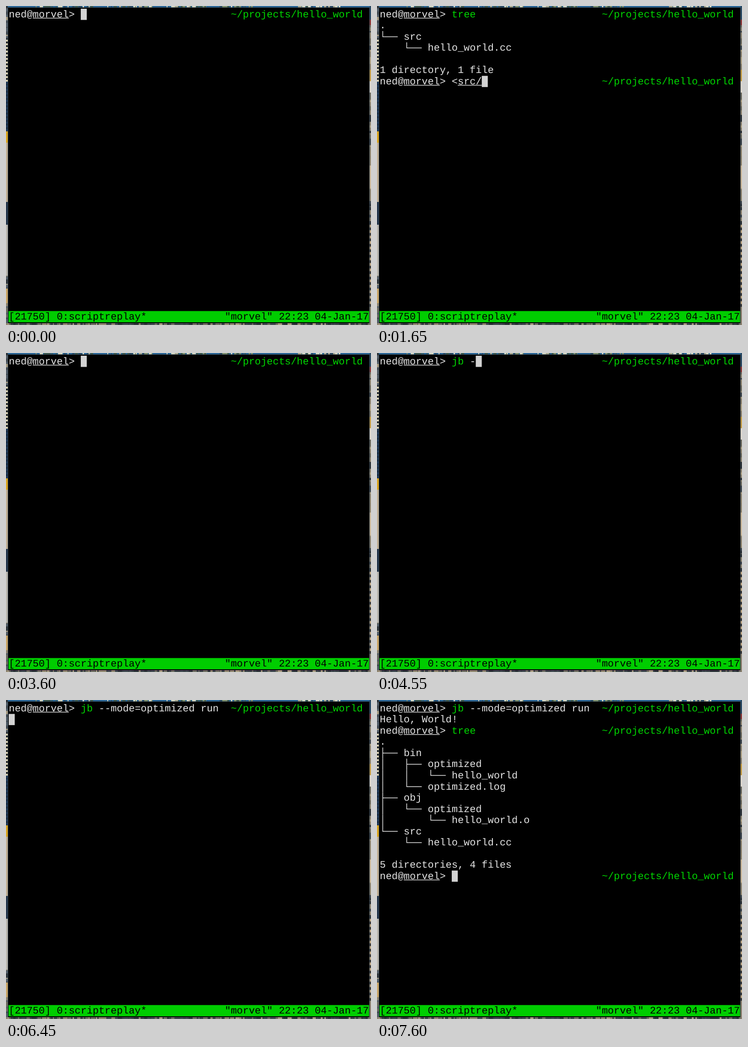
Recreate the animation shown at these times as an HTML page. Size 800 by 700 pixels, loop 8000 ms.

```html
<!DOCTYPE html>
<html lang="en">
<head>
<meta charset="utf-8">
<title>Terminal session</title>
<style>
html, body { margin: 0; width: 100%; height: 100%; overflow: hidden; background: #000; }
svg { display: block; width: 800px; height: 700px; }
text {
  font: 21.92px "Liberation Mono", monospace;
  white-space: pre;
  text-rendering: geometricPrecision;
}
text.bold { font-weight: bold; }
</style>
</head>
<body>
<svg id="stage" viewBox="0 0 800 700" xmlns="http://www.w3.org/2000/svg">
  <g id="desk"></g>
  <rect x="4" y="3" width="793" height="693" fill="#26343f"/>
  <rect x="5" y="4" width="791" height="692"/>
  <rect x="5.5" y="669.4" width="790.3" height="24.6" fill="#00cd00"/>
  <g id="bar"></g>
  <g id="term"></g>
</svg>
<script>
const LOOP = 8000, X0 = 6, Y0 = 6, CW = 13.155, RH = 24.55;
const WHITE = '#e5e5e5', GREEN = '#00d700', RED = '#f00000';
const USER = 'ned', HOST = 'morvel', CWD = '~/projects/hello_world';
const el = id => document.getElementById(id);
const rect = (x, y, w, h, fill) =>
  `<rect x="${x}" y="${y}" width="${w}" height="${h}" fill="${fill}"/>`;
const esc = s => s.replace(/&/g, '&amp;').replace(/</g, '&lt;').replace(/>/g, '&gt;');

// Wallpaper edge around the window
let seed = 17;
const rnd = () => (seed = (seed * 16807) % 2147483647) / 2147483647;
const pick = list => list[Math.floor(rnd() * list.length)];

function strip(side, from, to, fill) {
  const n = to - from;
  if (side === 'top') return rect(from, 0, n, 3, fill);
  if (side === 'bottom') return rect(from, 696, n, 4, fill);
  return rect(side === 'left' ? 0 : 797, from, side === 'left' ? 4 : 3, n, fill);
}

function specks(side, from, to, step, tones) {
  let out = '';
  for (let p = from; p < to; p += step * (0.5 + rnd()))
    out += strip(side, Math.round(p), Math.round(p) + 2 + Math.floor(rnd() * step), pick(tones));
  return out;
}

function dashes(side, from, to, gap, light, dark) {
  let out = strip(side, from, to, dark);
  for (let p = from; p < to; p += gap) out += strip(side, p, p + gap / 2, light);
  return out;
}

function desk() {
  const tan = ['#a89c82', '#6f6d62', '#30363b', '#8f8570', '#434b52'];
  const city = ['#cfd3c0', '#7d8f6d', '#3e5a50', '#a8a890', '#2b4a63'];
  let out = strip('top', 0, 800, '#2b6594');
  for (const [a, b] of [[65, 188], [222, 322], [352, 440], [468, 545], [640, 730]])
    out += specks('top', a, b, 7, city);
  out += strip('bottom', 0, 800, '#3d444a') + specks('bottom', 0, 800, 9, tan);
  out += strip('left', 0, 700, '#55606a') + specks('left', 0, 74, 9, tan);
  out += dashes('left', 74, 166, 8, '#d8cfb0', '#25292c');
  out += dashes('left', 166, 275, 8, '#1f3a5a', '#1a2d44');
  out += strip('left', 275, 300, '#d9a520') + strip('left', 300, 430, '#bfae94');
  out += strip('left', 430, 480, '#26374c') + strip('left', 480, 592, '#b9b6ae');
  out += specks('left', 592, 620, 8, tan) + strip('left', 620, 652, '#c9a566');
  out += specks('left', 652, 700, 10, tan);
  out += strip('right', 0, 700, '#8b8271') + strip('right', 0, 30, '#2b4a63');
  out += strip('right', 30, 42, '#8a3a3a') + specks('right', 42, 140, 12, tan);
  out += strip('right', 140, 165, '#c09a48') + strip('right', 165, 190, '#d8d2c8');
  out += specks('right', 190, 350, 14, tan) + strip('right', 350, 400, '#c4b295');
  out += specks('right', 400, 480, 12, tan);
  return out + dashes('right', 480, 660, 12, '#b5a080', '#3a3b3c');
}

// Terminal drawing: a span is [column, row, text, colour, style]
function span([col, row, str, fill = WHITE, style = '']) {
  const x = X0 + col * CW, y = Y0 + row * RH + 18.7;
  const line = style === 'under' ? rect(x, y + 1.2, str.length * CW, 1.4, fill) : '';
  return `<text class="${style}" x="${x}" y="${y}" fill="${fill}">${esc(str)}</text>${line}`;
}

function branch(col, row, kind) {
  const x = X0 + (col + 0.5) * CW, top = Y0 + row * RH, mid = top + RH / 2;
  let d = `M${x} ${top}V${kind === 'L' ? mid : top + RH}`;
  if (kind !== 'I') d += `M${x - 0.7} ${mid}H${X0 + (col + 3) * CW}`;
  return `<path d="${d}" fill="none" stroke="${WHITE}" stroke-width="1.5"/>`;
}

const texts = (...list) => list.map(span).join('');

const prompt = row => texts(
  [0, row, USER + '@'],
  [4, row, HOST, WHITE, 'under'],
  [10, row, '>'],
  [37, row, CWD, GREEN]);

// Each row: guides (T, L, I or a blank per level) and a label
function tree(row, items, total) {
  let out = span([0, row, '.']);
  items.forEach(([guides, label], i) => {
    const r = row + 1 + i;
    [...guides].forEach((g, k) => { if (g !== ' ') out += branch(k * 4, r, g); });
    out += span([guides.length * 4, r, label]);
  });
  return out + span([0, row + items.length + 2, total]);
}

const command = (row, str, ok) =>
  span([12, row, str, ok ? GREEN : RED, ok ? '' : 'bold']);

const steps = [];
const show = (time, body, col, row) => steps.push({ time, body, col, row });

function typeTree(row, base, times) {
  [['t', 0], ['tr', 1], ['tre', 0], ['tree', 1]].forEach(([s, ok], i) =>
    show(times[i], base + command(row, s, ok), 12 + s.length, row));
}

// First listing
let base = prompt(0);
show(0, base, 12, 0);
typeTree(0, base, [500, 600, 700, 800]);
base += command(0, 'tree', true);
show(900, base, 0, 1);
base += tree(1, [['L', 'src'], [' L', 'hello_world.cc']], '1 directory, 1 file') + prompt(6);
show(950, base, 12, 6);

// Print the file
const redirect = path => texts([12, 6, '<'], [13, 6, path, WHITE, 'under']);
show(1250, base + span([12, 6, '<']), 13, 6);
show(1450, base + redirect('s'), 14, 6);
show(1650, base + redirect('src/'), 17, 6);
base += redirect('src/hello_world.cc');
show(1900, base, 32, 6);
show(2500, base, 0, 7);
base += texts(
  [0, 7, '#include <iostream>'],
  [0, 9, 'int main() {'],
  [2, 10, 'std::cout << "Hello, World!\\n";'],
  [0, 11, '}']);
show(2650, base, 0, 12);
base += prompt(12);
show(2750, base, 12, 12);

// Clear, then build and run
base = prompt(0);
show(3550, base, 12, 0);
show(4000, base + command(0, 'j', false), 13, 0);
base += command(0, 'jb', true);
show(4200, base, 14, 0);
show(4350, base, 15, 0);
const flag = '--mode=';
for (let n = 1; n <= flag.length; n++)
  show(4450 + n * 100, base + span([15, 0, flag.slice(0, n)]), 15 + n, 0);
const modes = texts([0, 1, 'debug'], [11, 1, 'default'], [22, 1, 'optimized']);
const args = str => base + span([15, 0, flag + str]);
show(5250, args('') + modes, 22, 0);
show(5500, args('o') + modes, 23, 0);
show(5650, args('optimized') + modes, 32, 0);
['r', 'ru', 'run'].forEach((s, i) =>
  show(6150 + i * 100, args('optimized ' + s) + modes, 33 + i, 0));
base = args('optimized run');
show(6450, base, 0, 1);
base += span([0, 1, 'Hello, World!']);
show(6650, base, 0, 2);
base += prompt(2);
show(6750, base, 12, 2);

// Second listing
typeTree(2, base, [7050, 7150, 7250, 7350]);
base += command(2, 'tree', true);
show(7500, base, 0, 3);
base += tree(3, [
  ['T', 'bin'],
  ['IT', 'optimized'],
  ['IIL', 'hello_world'],
  ['IL', 'optimized.log'],
  ['T', 'obj'],
  ['IL', 'optimized'],
  ['I L', 'hello_world.o'],
  ['L', 'src'],
  [' L', 'hello_world.cc']
], '5 directories, 4 files') + prompt(15);
show(7600, base, 12, 15);

el('desk').innerHTML = desk();
el('bar').innerHTML = texts(
  [0, 27, '[21750] 0:scriptreplay*', '#000'],
  [36, 27, `"${HOST}" 22:23 04-Jan-17`, '#000']);

let shown = null;
function draw(time) {
  let now = steps[0];
  for (const s of steps) if (s.time <= time) now = s;
  if (now === shown) return;
  shown = now;
  el('term').innerHTML = now.body +
    rect(X0 + now.col * CW, Y0 + now.row * RH, CW, RH, '#d3d3d3');
}

const start = performance.now();
function tick() {
  draw((performance.now() - start) % LOOP);
  requestAnimationFrame(tick);
}
tick();
</script>
</body>
</html>
```
